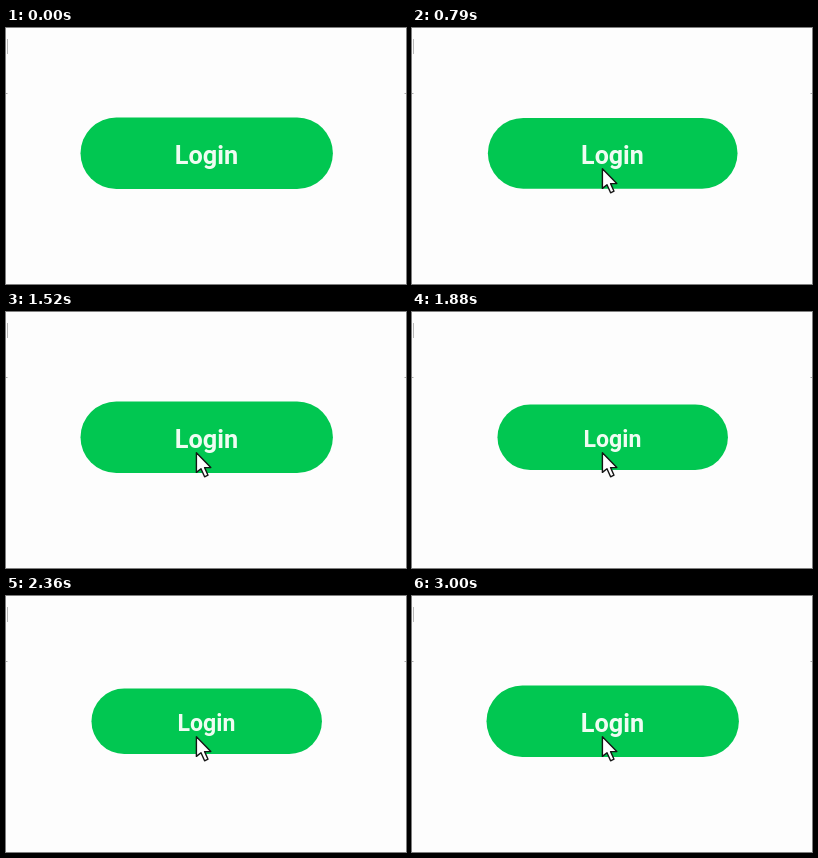
Animation of 400x256 px, one loop 3640 ms. Source, as an HTML page:

```html
<!DOCTYPE html>
<html lang="en">
<head>
<meta charset="utf-8">
<title>Login button</title>
<style>
  html, body { margin: 0; width: 100%; height: 100%; overflow: hidden; background: #fdfdfd; }
  svg { display: block; width: 400px; height: 256px; }
  text { font: 700 25.3px Roboto, Arial, sans-serif; fill: #effcf2; text-anchor: middle; }
  #button { filter: blur(0.6px); }
  #cursor { filter: blur(0.25px); }
</style>
</head>
<body>
<svg viewBox="0 0 400 256">
  <rect width="400" height="256" fill="#fdfdfd"/>
  <path d="M1.5 11V26" stroke="#b8b8b8"/>
  <path d="M0 65.5H1.5M398.5 65.5H400" stroke="#a8a8a8"/>
  <g id="button">
    <rect x="-126.2" y="-35.8" width="252.4" height="71.6" rx="35.8" fill="#01c751"/>
    <text x="-0.3" y="10.3">Login</text>
  </g>
  <path id="cursor" d="M0 0V19.6L4.6 15.9L8.2 24L11.6 22.4L8.2 14.8H14.4Z"
    fill="#fff" stroke="#151515" stroke-width="1.4" stroke-linejoin="round"/>
</svg>
<script>
  const LOOP = 3640;
  const ENTER = 210;
  const TRAVEL = 450;
  const DEPTH = 0.087;
  // Pointer down, pointer up
  const presses = [[760, 900], [1600, 1920], [2220, 2440]];

  const button = document.getElementById('button');
  const cursor = document.getElementById('cursor');

  const clamp = p => Math.min(1, Math.max(0, p));
  const mix = (a, b, p) => a + (b - a) * p;
  const smooth = p => p * p * (3 - 2 * p);
  const ramp = (t, start, length) => smooth(clamp((t - start) / length));

  // Ease out with a slight overshoot
  function glide(p, s = 1.09) {
    const q = p - 1;
    return 1 + (s + 1) * q ** 3 + s * q ** 2;
  }

  function pressed(t) {
    return presses.reduce((sum, [down, up]) => sum + ramp(t, down, 140) - ramp(t, up, 250), 0);
  }

  function render(t) {
    const p = glide(clamp((t - ENTER) / TRAVEL));
    button.setAttribute('transform', `translate(200.7 125.3) scale(${1 - DEPTH * pressed(t)})`);
    cursor.setAttribute('transform', `translate(${mix(308, 190.4, p)} ${mix(148.5, 140.8, p)})`);
    cursor.setAttribute('visibility', t < ENTER ? 'hidden' : 'visible');
  }

  const begin = performance.now();
  function loop() {
    render((performance.now() - begin) % LOOP);
    requestAnimationFrame(loop);
  }
  loop();
</script>
</body>
</html>
```
